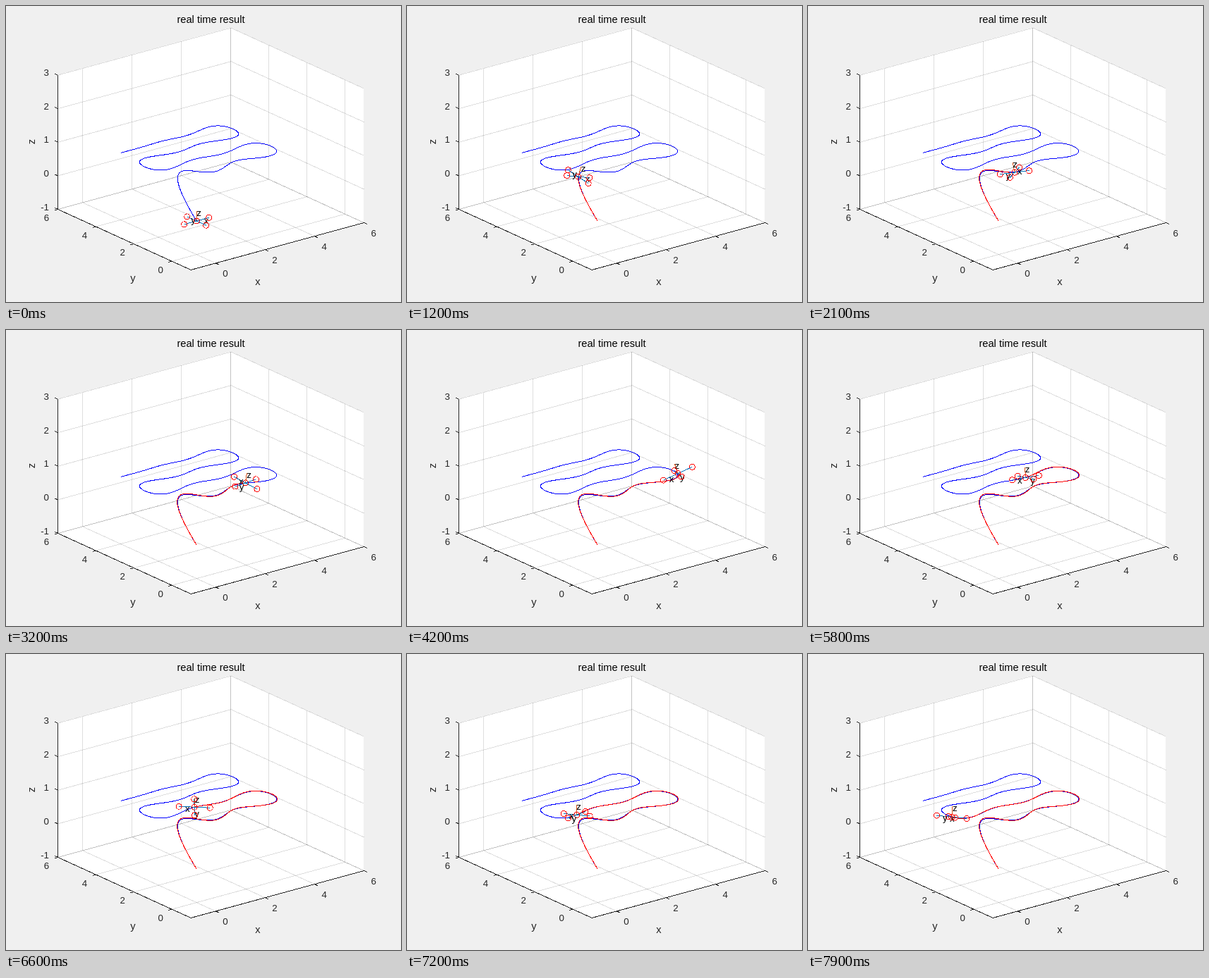
These frames come from a looping animation (560x420 px, 8000 ms). An HTML page:

```html
<!DOCTYPE html>
<html>
<head>
<meta charset="utf-8">
<style>
html, body { margin: 0; width: 100%; height: 100%; overflow: hidden; background: #f0f0f0; }
svg { display: block; font-family: "Liberation Sans", Arial, sans-serif; }
path, circle { fill: none; stroke-width: 1; shape-rendering: crispEdges; }
text { font-size: 13.33px; fill: #262626; text-anchor: middle; }
.big { font-size: 14.67px; }
.body { fill: #000; text-anchor: start; }
</style>
</head>
<body>
<svg width="560" height="420" viewBox="0 0 560 420">
  <g id="axes" transform="translate(.5 .5)"></g>
  <g id="scene" transform="translate(.5 .5)"></g>
</svg>
<script>
const LOOP = 8000, STEP = 100;             // ms
const ARM = 0.5, AXIS = 0.3;               // metres
const SPEED = 1.38, GRAVITY = 9.8;
const STIFF = 7.7, DAMPING = 0.5;          // how the drone chases its target
const DT = 0.01, LAST = 20;                // simulation step, last waypoint

// Waypoints: climb from the origin, then sweep rows of five back and forth
function waypoint(k) {
  if (k <= 0) return [0, 0, 0];
  const j = Math.min(k, LAST) - 1, row = Math.floor(j / 5), col = j % 5;
  return [row % 2 ? 4 - col : col, 1 + row, 1];
}

// Smooth interpolation through the waypoints with a damped sinc
function kernel(d) {
  return d ? Math.sin(Math.PI * d) / (Math.PI * d) * Math.exp(-0.07 * d * d) : 1;
}

function route(s) {
  const p = [0, 0, 0], mid = Math.floor(s);
  for (let k = mid - 8; k <= mid + 9; k++) {
    const w = kernel(s - k);
    waypoint(k).forEach((v, i) => p[i] += v * w);
  }
  return p;
}

// The first leg is a diagonal, so it takes longer than the unit legs
function target(t) {
  const d = SPEED * t;
  return route(d < Math.SQRT2 ? d / Math.SQRT2 : d - Math.SQRT2 + 1);
}

function simulate() {
  const log = [], pos = [0, 0, 0], vel = [0, 0, 0];
  for (let n = 0; n * DT <= LOOP / 1000; n++) {
    const goal = target(n * DT);
    const acc = pos.map((p, i) => STIFF * STIFF * (goal[i] - p) - 2 * DAMPING * STIFF * vel[i]);
    log.push({ pos: [...pos], acc });
    for (let i = 0; i < 3; i++) {
      vel[i] += acc[i] * DT;
      pos[i] += vel[i] * DT;
    }
  }
  return log;
}

const shift = ([x, y, z]) => [35.06 * x - 26.94 * y, -9.571 * x - 12.286 * y - 47.6 * z];
const add = (p, q, k = 1) => [p[0] + k * q[0], p[1] + k * q[1]];
const project = (x, y, z) => add([261.6, 374], shift([x + 1, y + 1, z + 1]));
const outline = pts => "M" + pts.map(p => p.map(v => v.toFixed(2))).join("L");
const path = (pts, color) => `<path d="${outline(pts)}" stroke="${color}"/>`;
const label = (s, x, y, cls = "", more = "") =>
  `<text x="${x}" y="${y}" class="${cls}" ${more}>${s}</text>`;

function drawAxes() {
  const ink = "#262626", grid = "rgba(38,38,38,.15)";
  const corners = [[-1, 6, 3], [6, 6, 3], [6, -1, 3], [6, -1, -1], [-1, -1, -1], [-1, 6, -1]];
  let out = `<path d="${outline(corners.map(c => project(...c)))}Z"
    transform="translate(-.5 -.5)" style="fill:#fff"/>`;
  const line = (a, b, color) => out += path([project(...a), project(...b)], color);
  const tick = (p, dx, dy) => out += path([p, add(p, [dx, dy])], ink);

  for (const k of [0, 2, 4, 6]) {
    line([k, -1, -1], [k, 6, -1], grid);
    line([k, 6, -1], [k, 6, 3], grid);
    line([-1, k, -1], [6, k, -1], grid);
    line([6, k, -1], [6, k, 3], grid);
  }
  for (let z = -1; z <= 3; z++) {
    line([-1, 6, z], [6, 6, z], grid);
    line([6, -1, z], [6, 6, z], grid);
  }
  line([-1, 6, -1], [-1, 6, 3], ink);
  line([-1, 6, -1], [-1, -1, -1], ink);
  line([-1, -1, -1], [6, -1, -1], ink);

  for (const k of [0, 2, 4, 6]) {
    const px = project(k, -1, -1), py = project(-1, k, -1);
    tick(px, 4.5, 2);
    tick(py, -4.7, 1.3);
    out += label(k, px[0] + 13.7, px[1] + 19.3) + label(k, py[0] - 16, py[1] + 16.5);
  }
  for (let z = -1; z <= 3; z++) {
    const p = project(-1, 6, z);
    tick(p, -4.5, -2);
    out += label(z, 60.5, p[1] + 1.2, "", 'style="text-anchor:end"');
  }
  out += label("real time result", 290, 23.5, "big", 'style="fill:#000"')
    + label("x", 356.5, 395, "big") + label("y", 179.5, 390.5, "big")
    + label("z", 0, 0, "big", 'transform="translate(40.5 192) rotate(-90)"');
  document.getElementById("axes").innerHTML = out;
}

// Heading swings between 0 and 180 degrees; the body leans into its acceleration
function drone({ pos, acc }, t) {
  const center = project(...pos);
  const yaw = Math.PI / 2 * (1 - Math.cos(0.703 * Math.max(t - 0.8, 0)));
  const c = Math.cos(yaw), s = Math.sin(yaw);
  const lx = acc[0] / GRAVITY, ly = acc[1] / GRAVITY;
  const [x, y, z] = [[c, s, -lx * c - ly * s], [-s, c, lx * s - ly * c], [lx, ly, 1]].map(v => {
    const n = Math.hypot(...v);
    return shift(v.map(e => e / n));
  });
  const tips = [x, y].flatMap(v => [add(center, v, ARM), add(center, v, -ARM)]);
  let out = path(tips.slice(0, 2), "#0072bd") + path(tips.slice(2), "#0072bd")
    + path([center, add(center, z, AXIS)], "#d95319");
  [x, y, z].forEach((v, i) => {
    const end = add(center, v, AXIS);
    out += label("xyz"[i], end[0], end[1] + 7, "body");
  });
  for (const p of [...tips, center])
    out += `<circle cx="${p[0]}" cy="${p[1]}" r="4" stroke="#f00"/>`;
  return out;
}

const flight = simulate();
const trail = flight.map(f => project(...f.pos));
const planned = path(Array.from({ length: LAST * 12 + 1 }, (_, i) => project(...route(i / 12))), "#00f");
const scene = document.getElementById("scene");
let shown = -1;

function frame() {
  const n = Math.floor(performance.now() % LOOP / STEP);
  if (n !== shown) {
    shown = n;
    const t = n * STEP / 1000, i = Math.round(t / DT);
    scene.innerHTML = planned + path(trail.slice(0, i + 1), "#f00") + drone(flight[i], t);
  }
  requestAnimationFrame(frame);
}

drawAxes();
frame();
</script>
</body>
</html>
```
